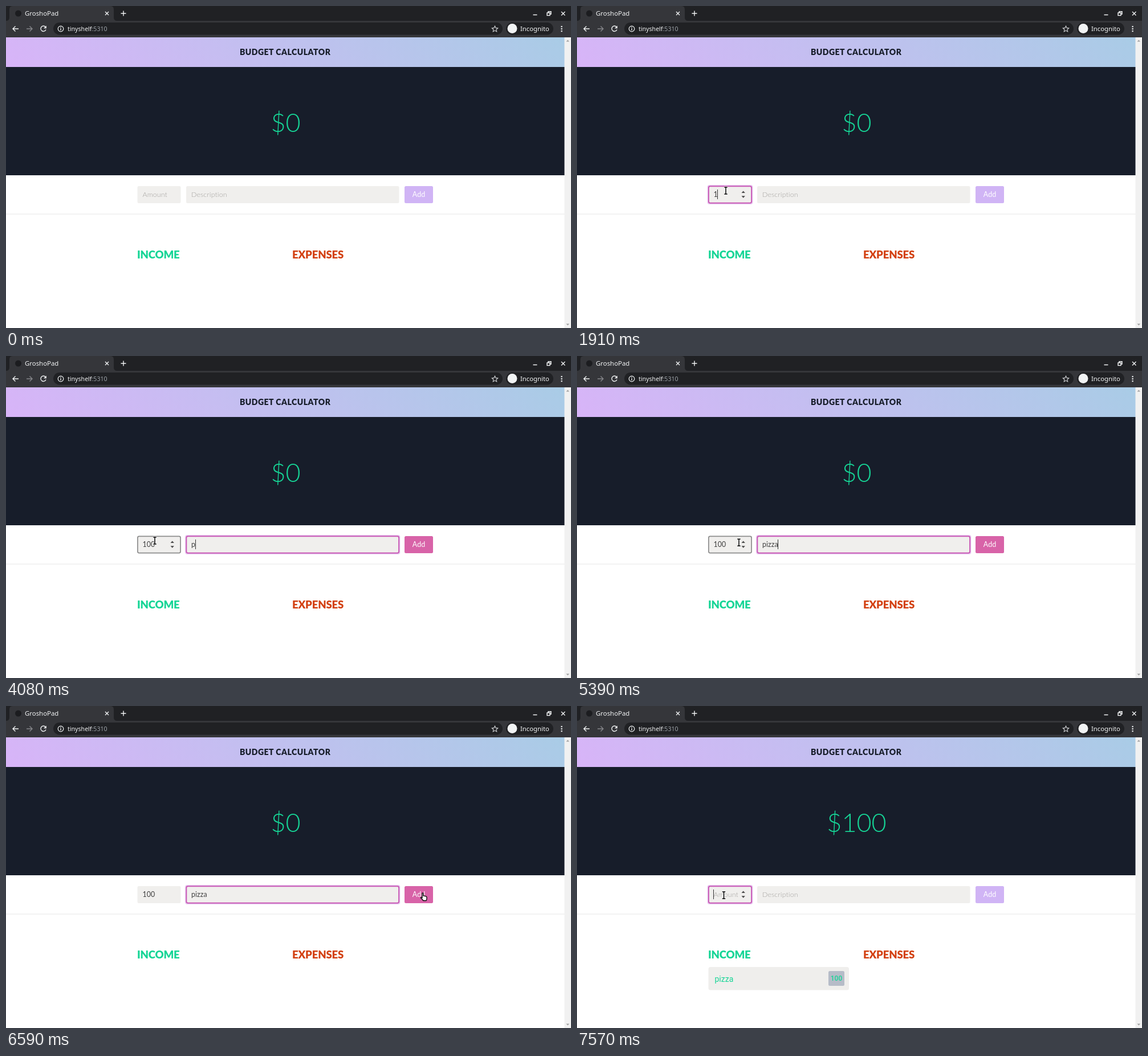
Recreate the animation shown at these times as an HTML page. Size 991x565 px, loop 8000 ms.

```html
<!DOCTYPE html>
<html lang="en">
<head>
<meta charset="utf-8">
<title>Budget calculator</title>
<style>
  html, body { margin: 0; width: 100%; height: 100%; overflow: hidden; background: #fff; }
  svg { display: block; width: 100vw; height: 100vh; }
  text { white-space: pre; }
  .ui { font-family: "Noto Sans", "Open Sans", sans-serif; fill: #f1f3f4; }
  .page { font-family: Lato, sans-serif; }
  .heavy { font-weight: 900; }
  .field { font-size: 12.4px; letter-spacing: .1px; fill: #404040; }
  .field.empty { font-weight: 300; fill: #a3a19e; }
  .item { font-family: Roboto, sans-serif; fill: #16d596; }
  .line { fill: none; stroke: #f1f3f4; stroke-width: 1.4; }
  .ring { fill: none; stroke-width: 1.7; }
</style>
</head>
<body>
<svg viewBox="0 0 991 565">
  <defs>
    <linearGradient id="sky" gradientUnits="userSpaceOnUse" x1="232" y1="339" x2="748" y2="-177">
      <stop offset="0" stop-color="#d8b4f8"/><stop offset="1" stop-color="#a9cce6"/>
    </linearGradient>
  </defs>

  <!-- browser window -->
  <g class="ui">
    <rect width="991" height="26" fill="#202124"/>
    <path d="M0 26Q6 26 6 20V6Q6 0 12 0H183Q189 0 189 6V20Q189 26 195 26Z" fill="#35363a"/>
    <rect y="26" width="991" height="29" fill="#35363a"/>
    <circle cx="21.5" cy="13" r="5.5" fill="#1c1d20"/>
    <text x="33" y="17" font-size="11.4">GroshoPad</text>
    <path class="line" d="M174 10l6 6m0-6l-6 6M201.500 13h9m-4.500-4.500v9"/>
    <path class="line" stroke-width="2" d="M924.500 15.500h7M974 10l6.500 6.500m0-6.500l-6.500 6.500"/>
    <path class="line" d="M949 12h5v4.500h-5zM951 12v-2.300h5v4.600h-2"/>
    <path class="line" d="M22 40H12m4.500-4.500L12 40l4.500 4.500"/>
    <path class="line" style="stroke:#85878b" d="M36 40h10m-4.500-4.500L46 40l-4.500 4.500"/>
    <path class="line" d="M69.500 37A4.700 4.700 0 1 0 70 41.500"/>
    <path d="M70.800 34.500v4.700h-4.700z"/>
    <rect x="83" y="29" width="788" height="21.500" rx="10.700" fill="#202124"/>
    <circle class="line" cx="96" cy="40" r="4.800" style="stroke-width:1.200"/>
    <path class="line" d="M96 39.200v3.500M96 36.800v1.400"/>
    <text x="108" y="43.500" font-size="10.600">tinyshelf<tspan fill="#9aa0a6">:5310</tspan></text>
    <path class="line" style="stroke:#d0d2d5;stroke-width:1.100"
      d="M857.500 35l1.500 3.400 3.700.4-2.800 2.500.8 3.700-3.200-1.900-3.200 1.900.8-3.700-2.800-2.500 3.700-.4z"/>
    <rect x="877" y="29" width="83" height="21.500" rx="10.700" fill="#202124"/>
    <circle cx="888" cy="39.500" r="8.500"/>
    <text x="902" y="43.700" font-size="11.300">Incognito</text>
    <path d="M973.500 35h2.200v2.200h-2.200zm0 4h2.200v2.200h-2.200zm0 4h2.200v2.200h-2.200z"/>
  </g>

  <!-- page -->
  <g class="page">
    <rect y="55" width="980" height="52" fill="url(#sky)"/>
    <rect y="107" width="980" height="190" fill="#171d2a"/>
    <rect y="364.500" width="980" height="1.200" fill="#ececec"/>
    <rect x="979.500" y="55" width="11.500" height="510" fill="#f1f1f1"/>
    <path d="M982.500 62.500l2.800-3 2.800 3zM982.500 557.500l2.800 3 2.800-3z" fill="#a0a0a0"/>
    <text class="heavy" x="489.700" y="86" font-size="14" letter-spacing=".5" text-anchor="middle" fill="#171d2a">BUDGET CALCULATOR</text>
    <text id="total" x="490.500" y="220.500" font-size="45" font-weight="300" text-anchor="middle" fill="#16d596"></text>
    <text class="heavy" x="230" y="443" font-size="18.600" letter-spacing="-.2" fill="#16d596">INCOME</text>
    <text class="heavy" x="502" y="443" font-size="18.600" letter-spacing="-.2" fill="#d34113">EXPENSES</text>

    <g id="fields"></g>
    <path id="spinner" d="M288.500 328l3.200-3.500 3.200 3.500zM288.500 333.300l3.200 3.500 3.200-3.500z" fill="#484848"/>
    <rect id="caret" y="322" width="1" height="17" fill="#333"/>
    <rect id="button" x="699" y="316" width="50" height="30" rx="2.500"/>
    <text x="724" y="335" font-size="12.400" text-anchor="middle" fill="#fff" letter-spacing=".1">Add</text>

    <g id="entry" class="item">
      <rect x="230.500" y="458" width="246.500" height="40.500" rx="3.500" fill="#efeeec"/>
      <rect x="441" y="465" width="28" height="26" rx="2.500" fill="#b6bcc8"/>
      <text x="241.500" y="483.500" font-size="14">pizza</text>
      <text x="455" y="482" font-size="12" font-weight="500" text-anchor="middle">100</text>
    </g>
  </g>

  <g id="pointer">
    <g id="beam" fill="none">
      <path d="M-3-6H3M0-6V6M-3 6H3" stroke="#fff" stroke-width="3"/>
      <path d="M-2.700-6H2.700M0-6V6M-2.700 6H2.700" stroke="#000" stroke-width="1.500"/>
    </g>
    <path id="arrow" d="M0 0V11.500L2.700 9l1.800 4 1.800-.8-1.800-3.900H8z" fill="#000" stroke="#fff"/>
    <path id="hand" d="M0 1q0-1.200 1-1.200T2 1V5l4.500.8q1.500.4 1.500 2V10q0 2-1 3.500H2Q0 11-2.500 8.800q-.2-1.500 1.200-1.200L0 8.500z" fill="#fff" stroke="#000" stroke-width="1.300"/>
    <g id="denied">
      <circle r="7" fill="#111"/><circle r="6" fill="#fff"/>
      <path d="M-2.800-2.800L2.800 2.800" stroke="#111" stroke-width="1.700"/>
      <circle r="4.200" fill="none" stroke="#111" stroke-width="1.600"/>
    </g>
  </g>
</svg>

<script>
const LOOP = 8000, BLINK = 580, SUBMIT = 6930;
const $ = id => document.getElementById(id);

const amount = {
  x: 230.5, w: 76, hint: 'Amount',
  typed: [[0, ''], [1910, '1'], [2220, '10'], [2400, '100'], [SUBMIT, '']]
};
const description = {
  x: 316, w: 373.5, hint: 'Description',
  typed: [[0, ''], [4080, 'p'], [4300, 'pi'], [4470, 'piz'], [4650, 'pizz'], [4850, 'pizza'], [SUBMIT, '']]
};
const fields = [amount, description];
const focusSteps = [[0, null], [1120, amount], [3500, description], [6840, null], [7570, amount]];

// start, end, number of steps, x and y reached
const moves = [
  [950, 1120, 3, 261, 324],
  [5390, 5540, 4, 408, 344],
  [5700, 5780, 3, 422.5, 331],
  [5970, 6290, 9, 730, 328],
  [7000, 7000, 1, 726.5, 329.5],
  [7060, 7460, 11, 257.5, 332]
];

const latest = (steps, t) => steps.filter(([at]) => at <= t).pop();
const show = (el, on) => el.setAttribute('visibility', on ? 'inherit' : 'hidden');
const ease = p => p * p * (3 - 2 * p);

function add(parent, tag, attrs) {
  const el = document.createElementNS('http://www.w3.org/2000/svg', tag);
  for (const name in attrs) el.setAttribute(name, attrs[name]);
  return parent.appendChild(el);
}

for (const f of fields) {
  const rect = (grow, attrs) => add($('fields'), 'rect', {
    x: f.x - grow, y: 316 - grow, width: f.w + 2 * grow, height: 30 + 2 * grow, rx: 2.5, ...attrs
  });
  rect(0, { fill: '#f0efed' });
  f.halo = rect(.4, { class: 'ring', stroke: '#e6c3ee', style: 'stroke-width:3' });
  f.ring = rect(-.4, { class: 'ring' });
  f.text = add($('fields'), 'text', { x: f.x + 9, y: 335 });
}

function pointerAt(t) {
  let x = 261, y = 317;
  for (const [start, end, count, toX, toY] of moves) {
    if (t < start) break;
    const gap = (end - start) / (count - 1 || 1);
    const done = gap ? Math.min(count, Math.floor((t - start) / gap + 1e-6) + 1) : count;
    const p = ease(done / count);
    x += (toX - x) * p;
    y += (toY - y) * p;
  }
  return { x, y };
}

function render(t) {
  const { x, y } = pointerAt(t);
  const visible = t >= moves[0][0];
  const over = (left, width) => visible && x >= left && x <= left + width && y >= 316 && y <= 346;
  const [focusTime, focused] = latest(focusSteps, t);

  for (const f of fields) {
    const [typedTime, value] = latest(f.typed, t);
    const active = f === focused;
    f.hover = over(f.x, f.w);
    f.text.textContent = value || f.hint;
    f.text.setAttribute('class', value ? 'field' : 'field empty');
    f.ring.setAttribute('stroke', active ? '#c64fb0' : '#8c8c8c');
    show(f.ring, active || f.hover);
    show(f.halo, active);
    if (active) {
      const since = t - Math.max(focusTime, typedTime);
      const width = value ? f.text.getComputedTextLength() : 0;
      $('caret').setAttribute('x', Math.round(f.x + 8.6 + width));
      show($('caret'), Math.floor(since / BLINK) % 2 === 0);
    }
  }
  if (!focused) show($('caret'), false);
  show($('spinner'), amount.hover || focused === amount);

  const valid = latest(description.typed, t)[1] !== '';
  const submitted = t >= SUBMIT;
  $('button').setAttribute('fill', valid ? '#d863a8' : '#d0b4f5');
  $('total').textContent = submitted ? '$100' : '$0';
  show($('entry'), submitted);

  const shape = fields.some(f => f.hover) ? 'beam' : !over(699, 50) ? 'arrow' : valid ? 'hand' : 'denied';
  for (const id of ['beam', 'arrow', 'hand', 'denied']) show($(id), id === shape);
  show($('pointer'), visible);
  $('pointer').setAttribute('transform', `translate(${x} ${y})`);
}

function tick() {
  render(performance.now() % LOOP);
  requestAnimationFrame(tick);
}
tick();
</script>
</body>
</html>
```
